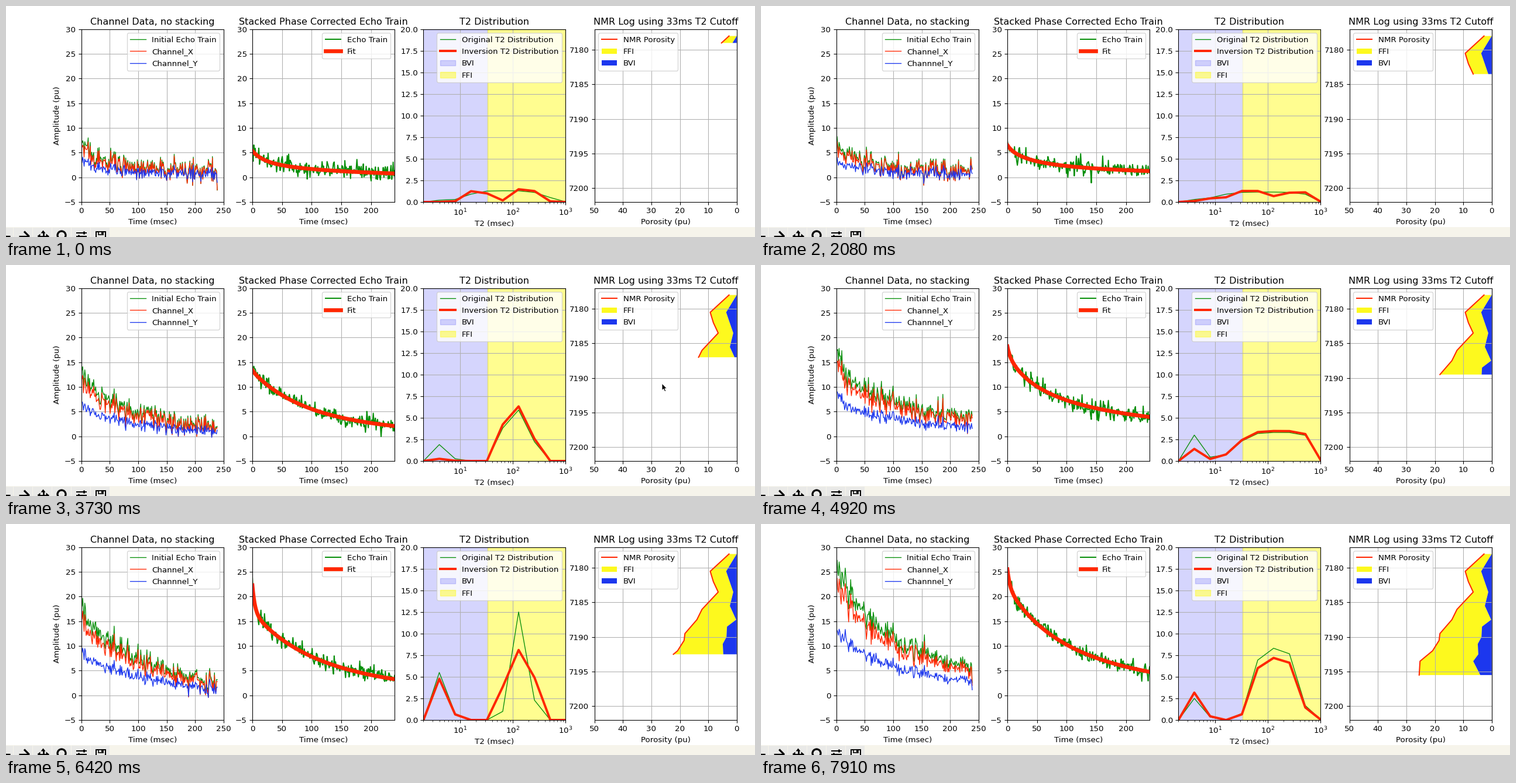
Animation, 1280 px wide and 396 px high, one loop 8000 ms. Source, as a matplotlib script:

```python
import numpy as np
import matplotlib.pyplot as plt
from matplotlib.animation import FuncAnimation
from matplotlib.patches import Circle, Polygon, Rectangle

W, H, DPI = 1280, 396, 96
LOOP_MS, FRAMES = 8000, 54
CURSOR_FRAME = 25
TOP_DEPTH, DEPTH_STEP = 7178.0, 0.5
RED, GREEN, BLUE, YELLOW = "#ff2600", "#078f0a", "#1c37ee", "#fdf91e"

plt.rcParams.update({"font.family": "DejaVu Sans", "toolbar": "None",
                     "legend.labelspacing": 0.55})

BINS = np.arange(1, 11)  # log2 of T2 in ms
TIME = np.linspace(0, 240, 201)

# How the T2 spectrum evolves: step, short peak, main peak, its centre, its width.
SHAPE = np.array([(0, .2, 1.3, 6.2, 2.4),
                  (4, 1.2, 2.1, 6.4, 1.85),
                  (9, .2, 1.15, 6.5, 3.0),
                  (16, 1.9, 5.9, 6.9, .93),
                  (21, 3.0, 3.3, 7.3, 2.5),
                  (27, 5.5, 12.5, 7.05, .7),
                  (33, 2.5, 8.3, 7.1, 1.42)]).T

# Log curves as (depth below the top, porosity units).
POROSITY = [(0, 2.7), (2.5, 9.3), (4, 8.2), (5.5, 6.5), (8, 12.2), (9.5, 14),
            (11.5, 18.2), (12.5, 18.5), (14, 20.8), (15.5, 25.2), (17.5, 25.5)]
BOUND = [(0, 0), (2.5, 3.7), (5.5, 1.2), (7.5, 2.4), (9.5, .2), (10.5, 3.4),
         (12, 3.6), (13, 4.9), (14.5, 4.7), (15.5, 6.5), (17.5, 4)]


def curve(points, x):
    return np.interp(x, *zip(*points))


def spectra(step, porosity):
    """Original spectrum and its inversion, which sums up to the porosity."""
    short, main, centre, width = (np.interp(step, SHAPE[0], row) for row in SHAPE[1:])
    inside = (BINS > 1) & (BINS < 10)
    short_peak = short * np.exp(-2 * (BINS - 2.0) ** 2) * inside

    def main_peak(w):
        return main * np.exp(-0.5 * ((BINS - centre) / w) ** 4) * inside

    # At low porosity the inversion ripples and misses the short peak.
    ripple = np.cos(2 * np.pi * (BINS - 4.2 - (step / 8) ** 2) / 3.3)
    fit_short = short_peak * max(0, (step - 14) / 15)
    fit_main = main_peak(max(width, 0.95)) * (1 + 0.85 * max(0, 1 - step / 16) * ripple)
    fit_main *= (porosity - fit_short.sum()) / fit_main.sum()
    return short_peak + main_peak(width), fit_short + fit_main


def decay(amplitudes):
    return np.exp(-TIME[:, None] / 2.0 ** BINS) @ amplitudes


fig = plt.figure(figsize=(W / DPI, H / DPI), dpi=DPI, facecolor="white")


def panel(index, title, xlabel, xlim, ylim):
    left = 128.8 + 292.3 * index
    ax = fig.add_axes([left / W, 60 / H, 243 / W, 296.4 / H])
    ax.set(xlabel=xlabel, xlim=xlim, ylim=ylim)
    ax.set_title(title)
    ax.grid(True)
    return ax


def line(ax, color, width, label):
    return ax.plot([], [], color=color, lw=width, label=label)[0]


raw_ax = panel(0, "Channel Data, no stacking", "Time (msec)", (0, 250), (-5, 30))
raw_ax.set_ylabel("Amplitude (pu)")
raw_line = line(raw_ax, GREEN, 1, "Initial Echo Train")
x_line = line(raw_ax, RED, 1, "Channel_X")
y_line = line(raw_ax, BLUE, 1, "Channnel_Y")
raw_ax.legend(loc="upper right")

echo_ax = panel(1, "Stacked Phase Corrected Echo Train", "Time (msec)",
                (0, 240), (-5, 30))
echo_line = line(echo_ax, GREEN, 1.5, "Echo Train")
fit_line = line(echo_ax, RED, 5, "Fit")
echo_ax.legend(loc="upper right")

t2_ax = panel(2, "T2 Distribution", "T2 (msec)", (2, 1000), (0, 20))
t2_ax.set_xscale("log")
t2_ax.set_xlim(2, 1000)
original_line = line(t2_ax, GREEN, 1, "Original T2 Distribution")
inverted_line = line(t2_ax, RED, 3, "Inversion T2 Distribution")
t2_ax.axvspan(1, 33, color="#0a0af5", alpha=0.17, label="BVI")
t2_ax.axvspan(33, 1000, color="#fffb0a", alpha=0.45, label="FFI")
t2_ax.legend(loc="upper right")

log_ax = panel(3, "NMR Log using 33ms T2 Cutoff", "Porosity (pu)",
               (50, 0), (7202, 7177))
porosity_line = line(log_ax, RED, 1.5, "NMR Porosity")
free_area, = log_ax.fill([0], [TOP_DEPTH], color=YELLOW, lw=0, label="FFI")
bound_area, = log_ax.fill([0], [TOP_DEPTH], color=BLUE, lw=0, label="BVI")
log_ax.legend(loc="upper left")

# Pixel-space layer for the toolbar strip and the mouse pointer.
screen = fig.add_axes([0, 0, 1, 1], zorder=5)
screen.set(xlim=(0, W), ylim=(H, 0))
screen.axis("off")


def box(x, y, w, h, color, edge="none", width=0):
    screen.add_patch(Rectangle((x, y), w, h, fc=color, ec=edge, lw=width))


def stroke(points, width=1.8):
    screen.plot(*zip(*points), color="black", lw=width, solid_capstyle="butt")


def draw_toolbar():
    paper, button = "#f6f4eb", "#e9e9e7"
    box(0, 378.5, W, 18, paper)
    for i in range(6):
        box(-20 + 33 * i, 380, 32, 17, button)
    for tip, side in ((-10, -1), (39, 1)):  # back and forward arrows
        stroke([(tip - side * 17, 394.5), (tip - side * 2, 394.5)], 2.4)
        stroke([(tip - side * 8, 386.5), (tip, 394.5), (tip - side * 8, 402)], 2.4)
    x, y = 63.5, 394.5  # pan cross
    stroke([(x - 9, y), (x + 9, y)], 2)
    stroke([(x, y - 8), (x, y + 2)], 2)
    for dx, dy in ((0, -1), (-1, 0), (1, 0)):
        tip = np.array([x + 10 * dx, y + 10 * dy])
        base = tip - 5 * np.array([dx, dy])
        wing = 4 * np.array([dy, dx])
        screen.add_patch(Polygon([tip, base + wing, base - wing], fc="black", lw=0))
    screen.add_patch(Circle((95, 393), 7, fill=False, ec="black", lw=2.4))
    for y, knob in ((388.5, 133), (394.5, 124)):
        stroke([(120, y), (138, y)], 1.5)
        stroke([(knob, y - 2.5), (knob, y + 2.5)], 2)
    box(154, 386.5, 16, 14, button, "black", 1.5)
    box(157.5, 386.5, 8, 5, button, "black", 1.2)
    box(162.5, 387, 3, 4, "black")


draw_toolbar()
POINTER = [(0, 0), (0, 12), (2.8, 9.6), (4.8, 14), (6.8, 13), (4.9, 8.8), (8.6, 8.8)]
pointer = screen.add_patch(Polygon(np.array(POINTER) + (1121, 203), fc="black",
                                   ec="white", lw=0.7, visible=False))


def draw_trains(step, original, inverted):
    rng = np.random.default_rng(100 + step)
    clean, fit = decay(original), decay(inverted)
    noise, small, stacked = rng.normal(0, [[1.25], [0.25], [0.85]], (3, TIME.size))
    angle = np.pi / 6
    for artist, data in ((raw_line, clean + noise),
                         (x_line, clean * np.cos(angle) + noise * 0.95),
                         (y_line, clean * np.sin(angle) + noise * 0.5 + small)):
        artist.set_data(TIME[1:-1], data[1:-1])
    echo_line.set_data(TIME, fit + stacked)
    fit_line.set_data(TIME, fit)


def draw_log(below):
    depth = TOP_DEPTH + below
    total, bound = curve(POROSITY, below), curve(BOUND, below)
    porosity_line.set_data(total, depth)
    both_ways = np.r_[depth, depth[::-1]]
    free_area.set_xy(np.c_[np.r_[total, bound[::-1]], both_ways])
    bound_area.set_xy(np.c_[np.r_[bound, bound * 0], both_ways])


def update(frame):
    step = (5 * frame + 3) // 8  # five depth steps in eight frames
    below = np.arange(step + 3) * DEPTH_STEP
    original, inverted = spectra(step, curve(POROSITY, below[-1]))
    draw_trains(step, original, inverted)
    original_line.set_data(2.0 ** BINS, original)
    inverted_line.set_data(2.0 ** BINS, inverted)
    draw_log(below)
    pointer.set_visible(frame == CURSOR_FRAME)
    return []


anim = FuncAnimation(fig, update, frames=FRAMES, interval=LOOP_MS / FRAMES,
                     init_func=lambda: update(0), repeat=True, repeat_delay=0)
plt.show()
```
